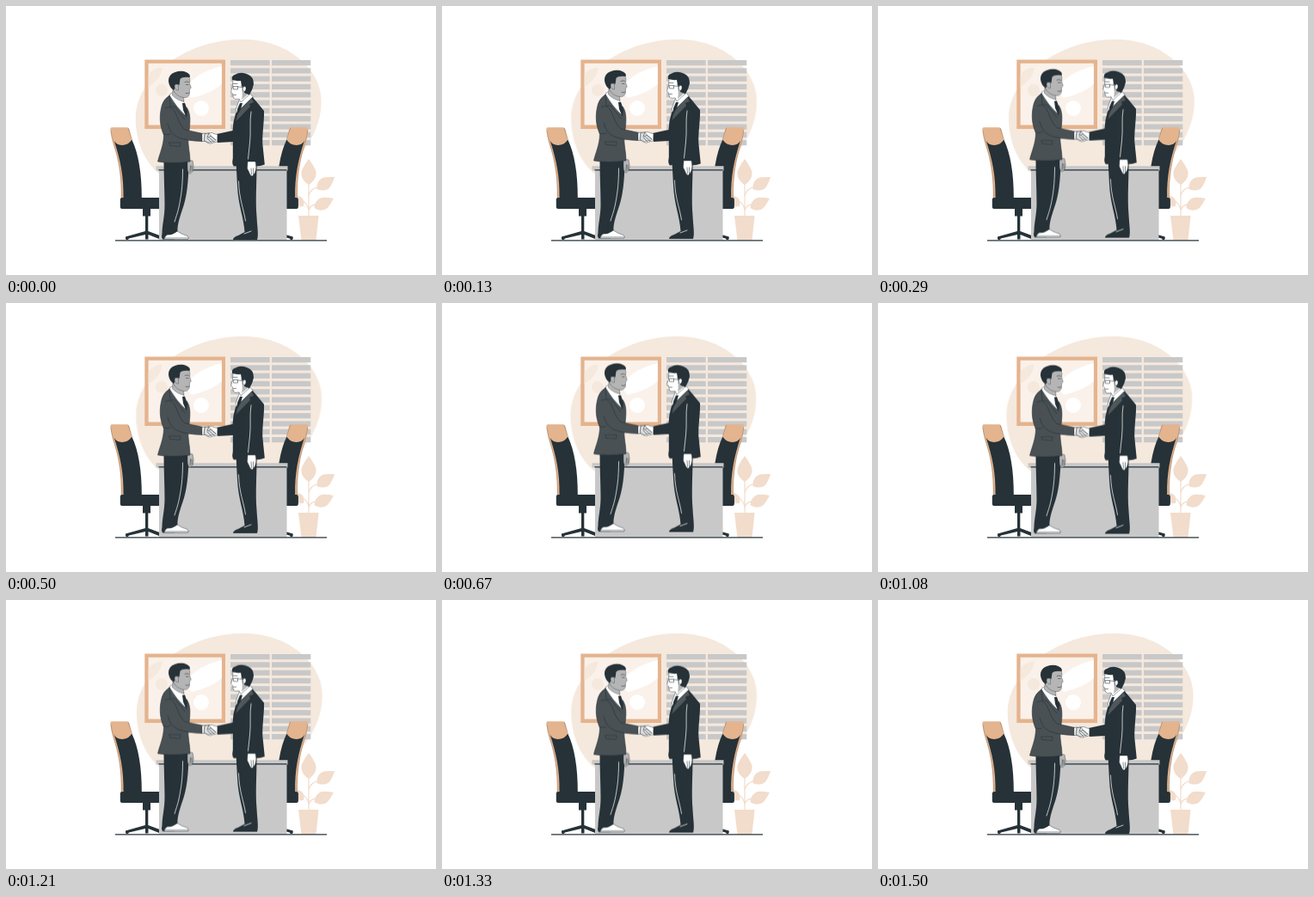
Animation of 500x313 px, one loop 1.54 s. Source, as an HTML page:

```html
<!DOCTYPE html>
<html lang="en">
<head>
<meta charset="utf-8">
<title>Handshake</title>
<style>
html, body { margin: 0; width: 100%; height: 100%; overflow: hidden; background: #fff; }
svg { display: block; width: 100vw; height: 100vh; }
.dark { fill: #263238; }
.suit { fill: #495155; stroke: #263238; stroke-width: .6; }
.tan { fill: #e4b48e; }
.pale { fill: #f5e8dd; }
.sand { fill: #f2dccb; }
.grey { fill: #c8c8c8; }
.white { fill: #fff; }
.skin { fill: #b5b5b5; stroke: #263238; stroke-width: .35; }
.fair { fill: #fff; stroke: #263238; stroke-width: .45; }
.line { fill: none; stroke: #263238; stroke-width: .55; stroke-linecap: round; stroke-linejoin: round; }
.crease { fill: none; stroke: #e8e8e8; stroke-width: .8; stroke-linecap: round; }
.stem { fill: none; stroke: #f2dccb; stroke-width: 1.2; }

/* 1500 ms of motion, then a 40 ms rest */
.blob { animation: shake 1540ms ease infinite; }
.men { animation: float 1540ms linear infinite; }
@keyframes float {
  0%, 97.4%, 100% { transform: translateY(0); }
  48.7% { transform: translateY(-6.2px); }
}
@keyframes shake {
  0%, 97.4%, 100% { transform: translateX(0); }
  9.74%, 87.66% { transform: translateX(-.63px); }
  19.48%, 77.92% { transform: translateX(1.25px); }
  29.22%, 48.7%, 68.18% { transform: translateX(-2.5px); }
  38.96%, 58.44% { transform: translateX(2.5px); }
}
</style>
</head>
<body>
<svg viewBox="0 0 500 313" preserveAspectRatio="none">
  <defs>
    <g id="chair">
      <path class="tan" d="M123 141.3H140Q143 141.3 143.8 144.5L147 158L136.500 223H133.800C134.500 200 131 180 125.5 163Q122 152 121.3 143Q121.3 141.3 123 141.3Z"/>
      <path class="line" stroke-width=".4" opacity=".4" d="M122 145C123 155 126 162 128 170C133 187 134.500 205 134.300 223M142 142L146.500 155"/>
      <path class="dark" d="M125.500 156C128 163.500 141 164.500 146.300 155.500C154 171 158 196 157.800 223H136.500C137 198 133 179 125.500 156Z"/>
      <path class="dark" d="M135 223H178V236H135Q132.800 236 132.800 234V225Q132.800 223 135 223ZM159 236H168V244.500H165.300V262L182 268.200V271H178L165.500 266V271.500H162V266L143 270.500Q142 272.500 140 272Q138.500 271 139 268.500L162 262V244.500H159Z"/>
    </g>
    <path id="leaf" d="M0 0C-7-4-11-12-7-19Q-4-25 0-30Q4-25 7-19C11-12 7-4 0 0Z"/>
  </defs>

  <path class="blob pale" d="M150.700 130C150.700 84 208 38.700 275 38.700C327 38.700 366.600 73 366.600 111C366.600 143 348 170 326 190C290 222 215 222 179 196C160 181 150.700 156 150.700 130Z"/>

  <!-- picture -->
  <path class="tan" d="M161.300 62.500H255V143H161.300Z"/>
  <path fill="#faf1ea" d="M165.600 66.700H250.800V138.500H165.600Z"/>
  <g class="pale">
    <path d="M165.600 94V80Q171 72 181.500 71.500Q181 84 165.600 94Z"/>
    <circle cx="181" cy="98" r="7"/>
  </g>
  <path class="white" d="M250.800 70V91Q240 101 216 107Q207 99 214 89Q226 76 250.800 70Z"/>
  <circle class="white" cx="227" cy="119" r="9"/>

  <g id="blinds" class="grey"></g>

  <!-- plant -->
  <g class="sand">
    <path class="stem" d="M352 245V205M352 239Q353 230 364 231M352 222Q353 212 365 210M352 237Q350 228 343 226"/>
    <use href="#leaf" x="352" y="208"/>
    <use href="#leaf" transform="translate(361.500 213) rotate(56) scale(.83)"/>
    <use href="#leaf" transform="translate(358.500 235) rotate(64) scale(.83)"/>
    <use href="#leaf" transform="translate(346 233) rotate(-42) scale(.6)"/>
    <path d="M340 244H363.600L360.500 272.500H343.500Z"/>
  </g>

  <use href="#chair"/>
  <use href="#chair" transform="translate(472.700) scale(-1 1)"/>

  <!-- desk -->
  <path class="grey" d="M178 190H326.500V272.500H178ZM174.500 186.200H327.500V191.500H174.500Z"/>
  <path class="dark" d="M177.500 190.300H326.500V191.600H177.500Z"/>
  <path class="dark" d="M127 272.300H373V273.500H127Z"/>

  <g class="men">
    <!-- left man -->
    <path class="dark" d="M182 264Q190 260 199 263L196 271.500H182Q180 268 182 264Z"/>
    <path class="fair" d="M188 266Q193 267 199 262Q205 266 211 267.500Q213.500 270 211.500 271.500H184Q184 268 188 266Z"/>
    <path class="line" d="M184.500 270H212"/>
    <path class="dark" d="M183.500 178C183.500 200 184.500 215 184.500 232C184.500 245 181.500 255 181.500 265Q191 268 199.500 262C199 255 202 246 205 237C210 224 212.500 205 212.500 178Z"/>
    <path class="crease" d="M205.500 190C205.500 210 203.500 222 201 234C199.500 241 197.500 246 196 251"/>
    <path class="skin" d="M211 179L217 180Q219 187 217.500 192L214 195.500Q211 194 211 188Z"/>
    <path class="line" d="M214.500 186L214 193M216 186L216.200 192"/>
    <path class="fair" d="M190 103L195 100L207 112L211 122L208 128L192 112Z"/>
    <path class="skin" d="M194 97L206 104L207 111Q201 111 193.500 104Z"/>
    <path class="skin" d="M196 84Q205 79 213 82Q214.500 86 213.500 90L215.300 95L213.600 97L213.300 103Q211 107.500 206 106.500Q198 105 194.500 98Z"/>
    <path class="dark" d="M195 98Q190 95 189 88Q188.500 80 196 77.200Q204 74.300 210 77.200Q215 79.500 213.500 83Q205 82 202.500 85L201.500 92L199 91Z"/>
    <path class="skin" d="M200.500 92Q196 89.500 196 94Q197 98.500 200.500 98Z"/>
    <path class="line" d="M208 88.500Q210 87 212.500 88.500M209.500 91.500H212M209 101.500Q211 102.500 213 101"/>
    <path class="suit" d="M190 104Q183 109 181.500 115C178 127 178.500 139 183.500 150C183.500 162 178.500 172 176.500 181Q193 184 214 181C214 170 211 162 212 152C215 133 214.500 124 210 118L209 128Q198 118 190 104Z"/>
    <path class="dark" d="M205 113L208 113L211 122L210 130L206 121Z"/>
    <path class="suit" d="M185 119C192 115 196 121 199 129Q203 140 208 144L229 148.500L228 157.500Q211 157 200 153Q191 149 188 137"/>
    <path class="line" d="M190 105L191 117L196 117L208 132M190 159H203L202.500 163.500L191 162.500ZM183 149Q187 151 191 149"/>

    <!-- right man -->
    <path class="dark" d="M267.500 182H291.500C291.700 205 289.800 225 291.500 245C292 256 294 267 292 272H264Q264 269 270 267L277.500 263C276.500 246 270 232 269 210Z"/>
    <path class="crease" d="M270.500 204C271 225 276.500 236 278.500 250"/>
    <path class="crease" stroke-width=".5" d="M277 265L285 262"/>
    <path class="fair" d="M272 107L283 101L288 107L270 125L267 121Z"/>
    <path class="fair" d="M264 84Q272 81 279 85L283 103L273 112L271 108Q266 109.500 264.500 107L263.500 102L261.500 100L263.500 94Z"/>
    <path fill="#b5b5b5" d="M273 92L279 93L281 103L274 109Q276 102 273 92Z"/>
    <path class="dark" d="M263 86Q262 81 266 80Q273 76 281 79.500Q288 82 288 91Q287 97 283 103.500L277 101L277.500 96L274 93L273 87Q268 87.500 263 86Z"/>
    <path class="fair" d="M275.500 94Q279.500 92 279 97Q278 100.500 275.500 99Z"/>
    <path class="line" d="M264.500 93.500H269.500V97H265ZM269.500 94L276 94.500M264 90.500H269M264.500 103.500L267.500 103.500"/>
    <path class="dark" d="M286.500 106L291 111L300 122C300.500 133 298 146 298.300 160L300.800 184.500Q293 188 281 185.500L265 186.500Q262.300 185 263.800 177V158L246 159L245 149L263.500 145Q264 134 267 125L271 121Z"/>
    <path fill="#50575b" d="M285.500 107L288 112L283 114L284 117L267.500 134L270 123Z"/>
    <path class="dark" d="M272 113L275 113L273 120L269 127L269 120Z"/>
    <path class="crease" d="M285 123C283 135 285 147 283.500 159L281.500 178"/>
    <path class="fair" d="M281 181L290 181Q292 188 289.500 194L286.500 198Q284 198 282.500 193L280.500 189Z"/>
    <path class="line" d="M285 189L285.500 196M287.500 189L287.500 196"/>

    <!-- handshake -->
    <path class="fair" d="M228 148.500L231.500 148V157.500L228 157.500Z"/>
    <path class="fair" d="M246 149.500L243 149Q239 146.500 236 148L231 148.500L230 156.500L235 159.500Q238 161 240.500 159L245.500 158Z"/>
    <path class="skin" fill-opacity=".45" d="M231 148.500L236 148L239 152L244 156Q243 158.500 240 157.500L235 159L230.500 156.500Z"/>
    <path class="line" d="M236 148L234 152.500Q236 154 238 151L244 156M234 154L239 159M237 153.500L241.500 158"/>
  </g>
</svg>
<script>
const blinds = document.getElementById('blinds');
const NS = 'http://www.w3.org/2000/svg';
for (let row = 0; row < 11; row++) {
  for (const [x, w] of [[261, 45.7], [309, 45.3]]) {
    const slat = document.createElementNS(NS, 'rect');
    const box = { x, y: 63 + row * 9.3, width: w, height: 6.2 };
    for (const key in box) slat.setAttribute(key, box[key]);
    blinds.append(slat);
  }
}
</script>
</body>
</html>
```
